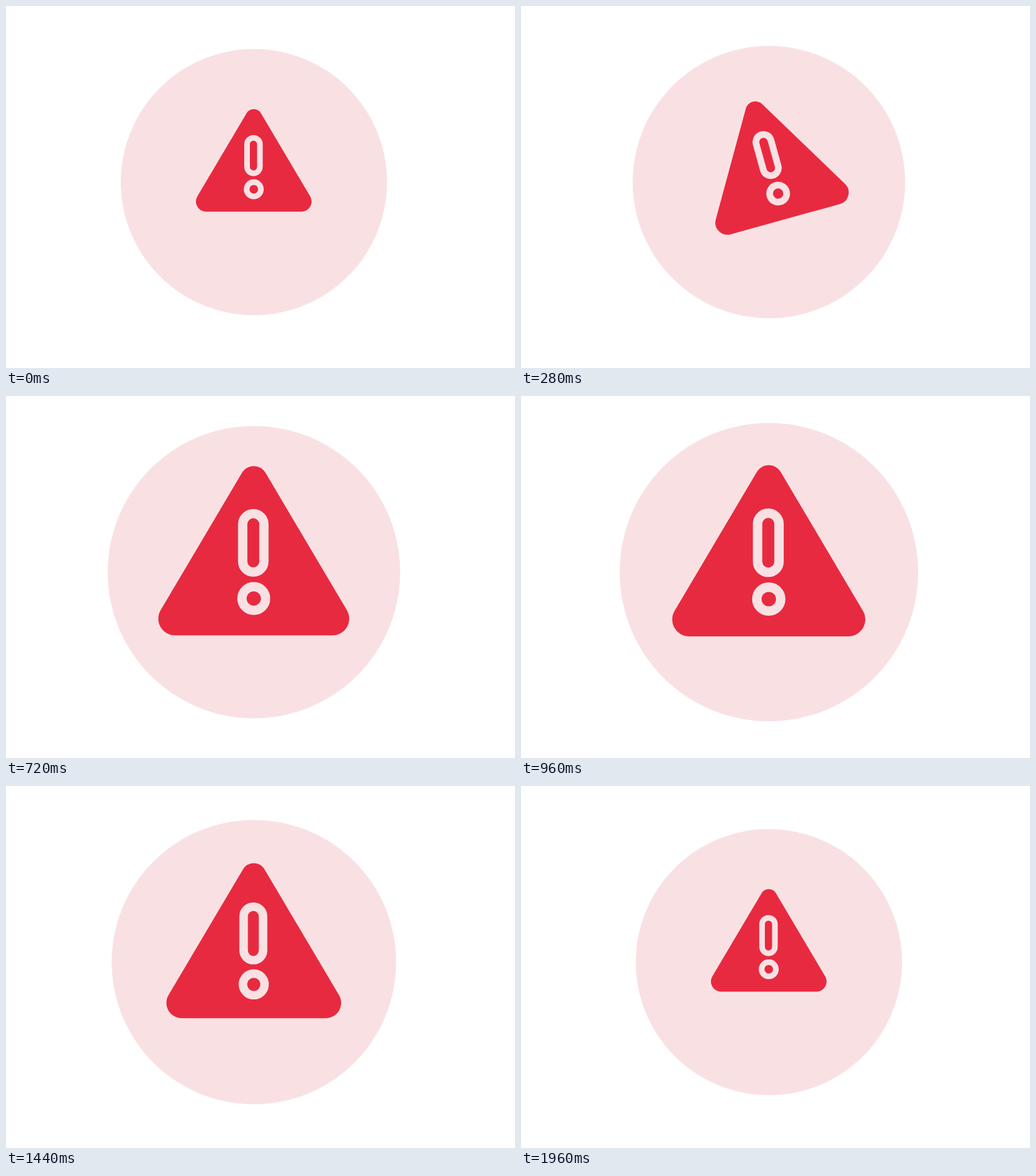
An HTML page for the animation above (2 s loop, 887 px wide and 631 px high).

```html
<!DOCTYPE html>
<html lang="en">
<head>
<meta charset="utf-8">
<title>Warning pulse</title>
<style>
  html, body { margin: 0; width: 100%; height: 100%; overflow: hidden; background: #fff; }
  svg { display: block; width: 887px; height: 631px; }
  .sign { fill: #e82a40; }
  .mark { fill: none; stroke: #f9e1e3; stroke-width: 16.4; }
</style>
</head>
<body>
<svg viewBox="0 0 887 631">
  <circle id="disc" cx="432" cy="307" r="232" fill="#f9e1e3"/>
  <g id="warning">
    <path class="sign" d="M-164.1 106.6L-20.7 -135.6A24.1 24.1 0 0 1 20.7 -135.6L164.1 106.6A29.5 29.5 0 0 1 138.75 151.1H-138.75A29.5 29.5 0 0 1 -164.1 106.6Z"/>
    <rect class="mark" x="-19.5" y="-63.6" width="37.4" height="103.1" rx="18.7"/>
    <circle class="mark" cy="86.1" r="20.8"/>
  </g>
</svg>
<script>
  const LOOP = 2000, STEP = 40;
  const FULL_SCALE = 1.67; // the sign is drawn at its largest size
  const disc = document.getElementById('disc');
  const warning = document.getElementById('warning');

  const ease = (t, start, end) => {
    const s = Math.min(1, Math.max(0, (t - start) / (end - start)));
    return s * s * (3 - 2 * s);
  };

  function render(t) {
    const swell = ease(t, 0, 1000) - ease(t, 1000, 1960);
    const grow = ease(t, 0, 800) - ease(t, 1200, 1960);
    const angle = 360 * ease(t, 0, 320);
    const scale = (1 + (FULL_SCALE - 1) * grow) / FULL_SCALE;
    disc.setAttribute('r', 232 + 28.2 * swell);
    warning.setAttribute('transform', `translate(431.75 267.9) rotate(${angle}) scale(${scale})`);
  }

  // The motion advances at 25 pictures per second.
  function tick(now) {
    render(Math.floor((now + 4) / STEP) * STEP % LOOP);
    requestAnimationFrame(tick);
  }

  render(0);
  requestAnimationFrame(tick);
</script>
</body>
</html>
```
